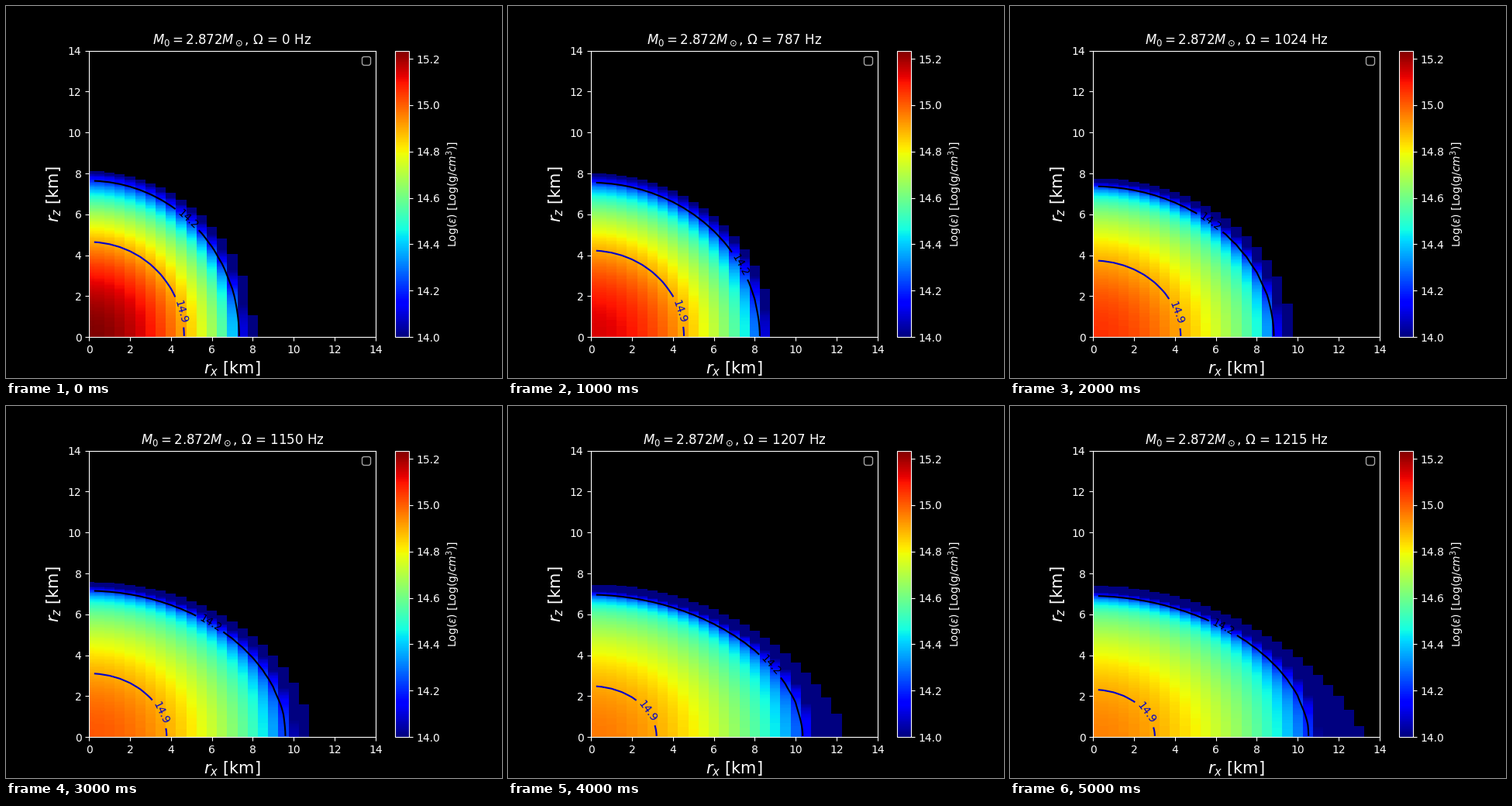
A matplotlib script that plays this animation: 640x480 px, repeating every 6 s.

```python
import numpy as np
import matplotlib.pyplot as plt
from matplotlib.animation import FuncAnimation
from matplotlib.cm import ScalarMappable
from matplotlib.colors import Normalize

plt.style.use("dark_background")

SIZE = 14
NORM = Normalize(14.0, 15.235)
CRUST, CORE = 14.2, 14.9

# One stage per spin rate: central log density, semi-axes (x, z) of the core
# and crust contours, shape exponent of the crust contour, semi-axes of the
# surface with its profile power, and label spots for the two contours.
STAGES = [
    dict(spin=0, peak=15.235, core=(4.65, 4.65), crust=(7.36, 7.64), n=2.0,
         edge=(8.07, 8.1), power=0.5, spots=[(4.8, 5.75), (4.6, 1.27)]),
    dict(spin=787, peak=15.14, core=(4.54, 4.23), crust=(8.25, 7.55), n=2.0,
         edge=(8.9, 8.0), power=0.5, spots=[(7.3, 3.5), (4.37, 1.27)]),
    dict(spin=1024, peak=15.06, core=(4.29, 3.74), crust=(8.86, 7.37), n=2.0,
         edge=(9.72, 7.77), power=0.5, spots=[(5.75, 5.65), (4.08, 1.18)]),
    dict(spin=1150, peak=15.01, core=(3.8, 3.11), crust=(9.63, 7.15), n=1.95,
         edge=(10.8, 7.58), power=0.54, spots=[(5.9, 5.54), (3.55, 1.18)]),
    dict(spin=1207, peak=14.965, core=(3.21, 2.49), crust=(10.37, 6.96), n=1.9,
         edge=(12.4, 7.47), power=0.68, spots=[(8.78, 3.5), (2.82, 1.3)]),
    dict(spin=1215, peak=14.955, core=(3.02, 2.32), crust=(10.55, 6.9), n=1.9,
         edge=(13.2, 7.4), power=0.75, spots=[(6.36, 5.35), (2.62, 1.18)]),
]


def log_density(stage, x, z):
    """Parabolic core that falls off steeply at the crust contour."""
    ax_, az = stage["core"]
    bx, bz = stage["crust"]
    n = stage["n"]
    peak = stage["peak"]
    core = peak - (peak - CORE) * ((x / ax_) ** 2 + (z / az) ** 2)
    core = np.maximum(core, CRUST + 0.1)
    v = ((x / bx) ** n + (z / bz) ** n) ** (1 / n)
    return np.maximum(core + (CRUST - core) * v ** 24, 13.9)


def surface(stage, x):
    """Height of the star's surface above x, negative outside the star."""
    width, height = stage["edge"]
    room = 1 - (x / width) ** 2
    return np.where(room > 0, height * np.maximum(room, 0) ** stage["power"], -1)


def build(ax, stage):
    columns = np.arange(0, SIZE + 0.5, 0.5)
    x_edges = np.append(columns - 0.25, SIZE + 0.25)
    z_edges = np.arange(0, 9.01, 0.05)
    x, z = np.meshgrid(columns, (z_edges[1:] + z_edges[:-1]) / 2)
    field = np.ma.masked_where(z > surface(stage, x), log_density(stage, x, z))
    mesh = ax.pcolormesh(x_edges, z_edges, field, cmap="jet", norm=NORM)

    x, z = np.meshgrid(np.append(0.25, columns[1:]), np.arange(0.05, 9, 0.1))
    lines = ax.contour(x, z, log_density(stage, x, z), levels=[CRUST, CORE],
                       colors=["black", "mediumblue"])
    lines.clabel(fmt="%.1f", fontsize=10, manual=stage["spots"])
    return [mesh, lines, *lines.labelTexts]


fig, ax = plt.subplots(figsize=(6.4, 4.8), dpi=100)
bar = fig.colorbar(ScalarMappable(NORM, "jet"), ax=ax)
bar.set_label(r"Log($\epsilon$) [Log(g/$cm^3$)]")
ax.set_aspect("equal")
ax.set_xlim(0, SIZE)
ax.set_ylim(0, SIZE)
ax.set_xlabel("$r_x$ [km]", fontsize=15)
ax.set_ylabel("$r_z$ [km]", fontsize=15)
ax.legend([], [], loc="upper right")
title = ax.set_title("")

# The label gaps depend on the final layout of the axes.
fig.canvas.draw()
layers = [build(ax, stage) for stage in STAGES]


def draw(i):
    for j, layer in enumerate(layers):
        for artist in layer:
            artist.set_visible(i == j)
    title.set_text(rf"$M_0 = 2.872 M_\odot$, $\Omega$ = {STAGES[i]['spin']} Hz")
    return [title]


anim = FuncAnimation(fig, draw, frames=len(STAGES), interval=1000,
                     init_func=lambda: draw(0), repeat=True, repeat_delay=0)
plt.show()
```
